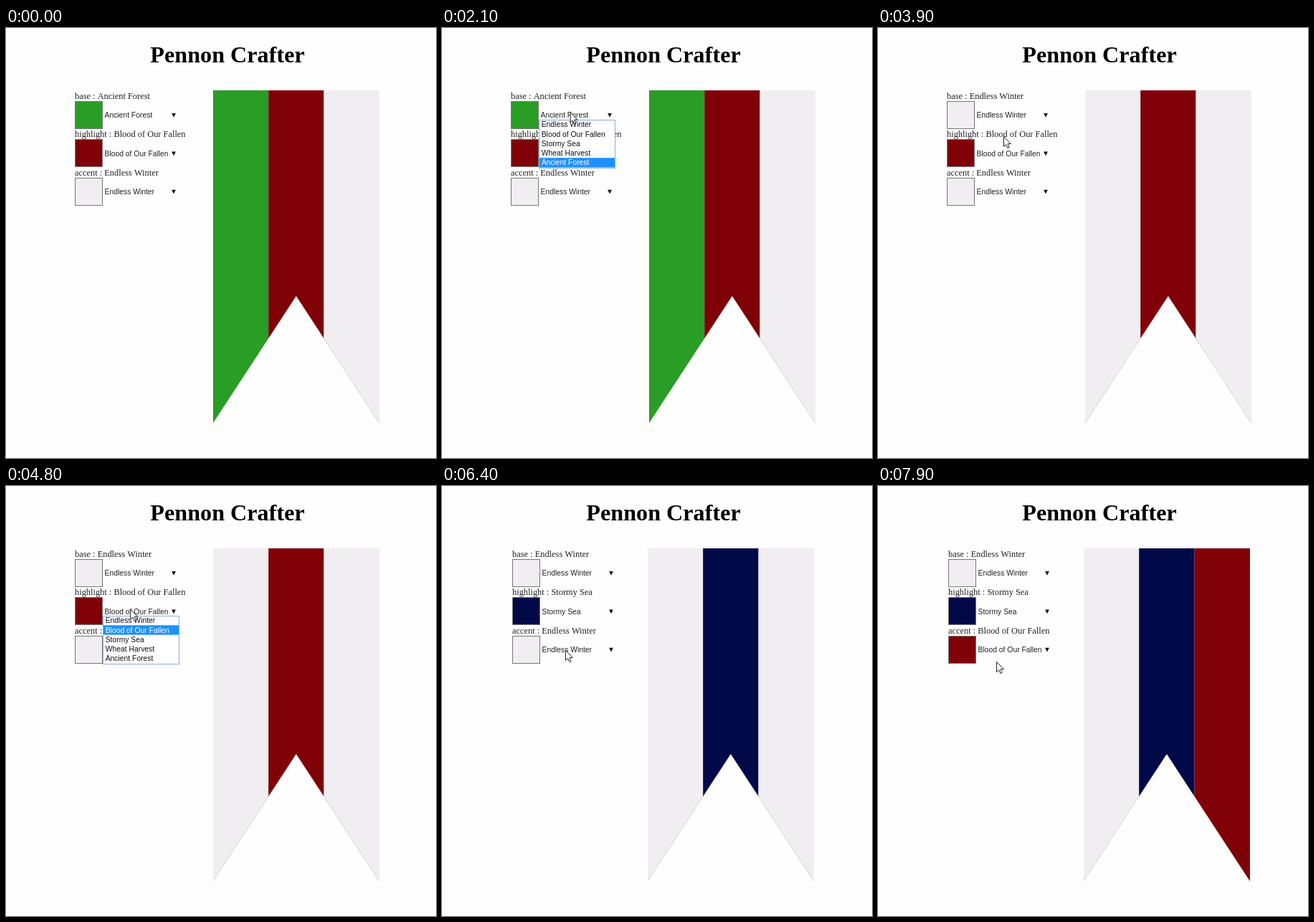
These frames come from a looping animation (600x600 px, 8000 ms). An HTML page with a canvas:

```html
<!DOCTYPE html>
<html lang="en">
<head>
<meta charset="utf-8">
<title>Pennon Crafter</title>
<style>
  html, body { margin: 0; width: 100%; height: 100%; overflow: hidden; background: #fefefe; }
  canvas { display: block; width: 600px; height: 600px; }
</style>
</head>
<body>
<canvas id="stage" width="600" height="600"></canvas>
<script>
const ctx = document.getElementById("stage").getContext("2d");
const LOOP = 8000, TICK = 100;
const SERIF = '"Liberation Serif", "Times New Roman", serif';
const SANS = '"Liberation Sans", Arial, sans-serif';
const SMALL = `10.35px ${SANS}`;
const INK = "#222";

const winter = { name: "Endless Winter", color: "#f0eef0" };
const blood = { name: "Blood of Our Fallen", color: "#800008" };
const sea = { name: "Stormy Sea", color: "#020948" };
const wheat = { name: "Wheat Harvest", color: "#e1be5a" };
const forest = { name: "Ancient Forest", color: "#2a9d26" };
const dyes = [winter, blood, sea, wheat, forest];

// Each field opens its menu once and takes a new dye when the menu closes.
const fields = [
  { label: "base", before: forest, after: winter, open: 1500, pick: 3200,
    selectAt: { x: 179, y: 115 }, dyeAt: { x: 177, y: 133 } },
  { label: "highlight", before: blood, after: sea, open: 4400, pick: 5500,
    selectAt: { x: 173, y: 169 }, dyeAt: { x: 178, y: 217 } },
  { label: "accent", before: winter, after: blood, open: 6500, pick: 7300,
    selectAt: { x: 172, y: 229 }, dyeAt: { x: 167, y: 249 } }
];
const FIELD_PITCH = 53.4, ROW_HEIGHT = 13.3, FADE = 300;
const ENTER_START = 100, ENTER_END = 900;
const enterFrom = { x: 518, y: 490 }, restAt = { x: 165, y: 245 };

const lerp = (a, b, k) => a + (b - a) * k;
const clamp = k => Math.max(0, Math.min(1, k));
const dyeOf = (field, t) => t >= field.pick ? field.after : field.before;

function glide(from, to, start, end, t) {
  const k = clamp((t - start) / (end - start)), eased = k * k * (3 - 2 * k);
  return { x: lerp(from.x, to.x, eased), y: lerp(from.y, to.y, eased) };
}

// The pointer swoops in, then visits each select and its chosen row in turn.
function pointerAt(t) {
  if (t < ENTER_START) return null;
  if (t < ENTER_END) {
    const k = (t - ENTER_START) / (ENTER_END - ENTER_START);
    const bow = 240 * Math.sin(Math.PI * k), end = fields[0].selectAt;
    return { x: lerp(enterFrom.x, end.x, k) - bow, y: lerp(enterFrom.y, end.y, k) - bow };
  }
  const i = fields.findIndex((field, n) => n === fields.length - 1 || t < field.pick + FADE);
  const field = fields[i], previous = fields[i - 1];
  if (t >= field.pick) return glide(field.dyeAt, restAt, field.pick + FADE, LOOP - FADE, t);
  if (t >= field.open) {
    return glide(field.selectAt, field.dyeAt, field.open + FADE, field.pick - TICK, t);
  }
  return previous
    ? glide(previous.dyeAt, field.selectAt, previous.pick + FADE, field.open - TICK, t)
    : field.selectAt;
}

function text(value, x, y, font, color = INK) {
  ctx.font = font;
  ctx.fillStyle = color;
  ctx.fillText(value, x, y);
}

function box(x, y, width, height, fill) {
  ctx.fillStyle = fill;
  ctx.fillRect(x, y, width, height);
}

function outline(x, y, width, height, color) {
  ctx.strokeStyle = color;
  ctx.lineWidth = 1;
  ctx.strokeRect(x + 0.5, y + 0.5, width - 1, height - 1);
}

function polygon(points) {
  ctx.beginPath();
  points.forEach(([x, y]) => ctx.lineTo(x, y));
  ctx.closePath();
}

function drawField(field, row, left, t) {
  const y = row * FIELD_PITCH, top = Math.round(102 + y), size = 39;
  const dye = dyeOf(field, t);

  text(`${field.label} : ${dye.name}`, left, 99 + y, `12.4px ${SERIF}`);

  box(left, top, size, size, field.before.color);
  ctx.globalAlpha = t < field.pick ? 0 : clamp((t - field.pick + TICK) / FADE);
  box(left, top, size, size, field.after.color);
  ctx.globalAlpha = 1;
  outline(left, top, size, size, "#777");

  text(dye.name, left + 41.5, 125.4 + y, SMALL);
  const arrow = left + 138;
  polygon([[arrow - 2.9, 119 + y], [arrow + 2.9, 119 + y], [arrow, 124.8 + y]]);
  ctx.fillStyle = "#111";
  ctx.fill();
}

function drawBanner(left, t) {
  const stripe = 77.4, width = 3 * stripe;
  const right = left + width, middle = left + width / 2;
  const top = 87, bottom = 551.5, notch = 374;

  ctx.save();
  polygon([[left, top], [right, top], [right, bottom], [middle, notch], [left, bottom]]);
  ctx.clip();
  fields.forEach((field, i) =>
    box(left + i * stripe, top, stripe, bottom - top, dyeOf(field, t).color));
  ctx.restore();

  // A faint hem keeps the pale cloth visible on the page.
  ctx.strokeStyle = "#cfcbc8";
  ctx.lineWidth = 0.8;
  fields.forEach((field, i) => {
    if (dyeOf(field, t) !== winter) return;
    const edge = i ? right : left;
    ctx.beginPath();
    ctx.moveTo(edge, bottom);
    ctx.lineTo(lerp(edge, middle, 2 / 3), lerp(bottom, notch, 2 / 3));
    ctx.stroke();
  });
}

function drawMenu(field, row, left, pointer) {
  const x = left + 39, y = Math.round(128 + row * FIELD_PITCH), width = 107;
  const height = Math.round(ROW_HEIGHT * dyes.length) + 1;
  const active = dyes[Math.floor((pointer.y - y) / ROW_HEIGHT)] || field.before;

  box(x, y, width, height, "#fff");
  dyes.forEach((dye, i) => {
    const rowTop = y + i * ROW_HEIGHT;
    if (dye === active) box(x + 1, rowTop, width - 2, ROW_HEIGHT, "#1e90ff");
    text(dye.name, x + 3.7, rowTop + 10.2, SMALL, dye === active ? "#fff" : "#111");
  });
  outline(x, y, width, height, "#86aee0");
}

function drawPointer({ x, y }) {
  ctx.save();
  ctx.translate(x + 0.5, y + 0.5);
  polygon([[0, 0], [0, 14], [3.2, 11], [5.4, 16], [7.6, 15], [5.5, 10.2], [9.8, 10]]);
  ctx.fillStyle = "#fff";
  ctx.fill();
  ctx.strokeStyle = INK;
  ctx.lineWidth = 1;
  ctx.stroke();
  ctx.restore();
}

function draw(t) {
  box(0, 0, 600, 600, "#fefefe");

  ctx.textAlign = "center";
  text("Pennon Crafter", 309, 48, `bold 32.2px ${SERIF}`, "#000");
  ctx.textAlign = "left";

  // The shorter highlight label narrows the centred layout.
  const shift = t >= fields[1].pick ? 2 : 0;
  const left = 96 + shift;
  const pointer = pointerAt(t);

  drawBanner(288.8 - shift, t);
  fields.forEach((field, row) => drawField(field, row, left, t));
  fields.forEach((field, row) => {
    if (t >= field.open && t < field.pick) drawMenu(field, row, left, pointer);
  });
  if (pointer) drawPointer(pointer);
}

const start = performance.now();
function frame() {
  const elapsed = (performance.now() - start) % LOOP;
  draw(Math.floor(elapsed / TICK) * TICK);
  requestAnimationFrame(frame);
}
frame();
</script>
</body>
</html>
```
